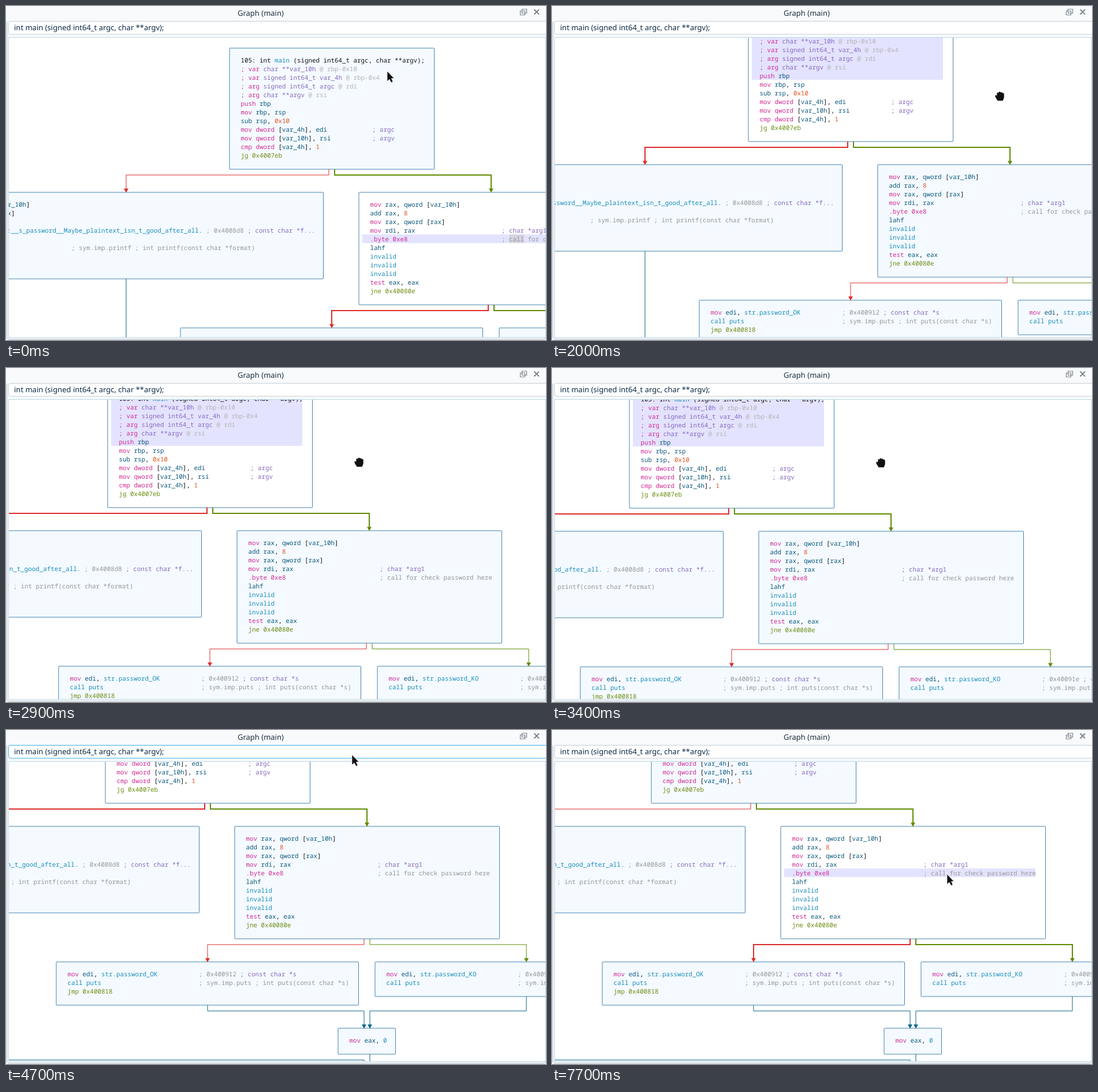
Recreate the animation shown at these times as an HTML page. Size 935 px wide and 579 px high, loop 8000 ms.

```html
<!DOCTYPE html>
<html lang="en">
<head>
<meta charset="utf-8">
<title>Graph (main)</title>
<style>
html, body { margin: 0; width: 100%; height: 100%; overflow: hidden; background: #f8fafb; }
svg { display: block; width: 935px; height: 579px; }
text { white-space: pre; text-rendering: geometricPrecision; }
.ui { font: 13px "Noto Sans", sans-serif; fill: #1c2f3f; }
.code { font: 10.833px "Noto Sans Mono", monospace; fill: #111; }
.p { fill: #d32a94; } .d { fill: #0a587c; } .b { fill: #1a8cba; }
.o { fill: #e0531f; } .g { fill: #6b8c10; } .v { fill: #8768bd; }
.c { fill: #969696; } .l { fill: #b4b4b4; } .k { fill: #111; }
.node { fill: #f4faff; stroke: #4583b0; }
.node.on { fill: #fff; }
.mark { fill: #e4e3ff; visibility: hidden; }
.mark.on { visibility: visible; }
.edge path { fill: none; stroke: currentColor; }
.edge polygon { fill: currentColor; }
.edge.on path { stroke-width: 2; }
</style>
</head>
<body>
<svg viewBox="0 0 935 579">
  <defs><clipPath id="view"><rect x="5" y="55" width="929" height="519"/></clipPath></defs>
  <rect width="935" height="579" fill="#f8fafb"/>
  <path d="M1.5 27V573Q1.5 577.5 6 577.5H931Q934.5 577.5 934.5 574" fill="none" stroke="#b4bec6"/>
  <text class="ui" x="401" y="17">Graph (main)</text>
  <g fill="none" stroke="#7b868e">
    <path d="M893.5 5.5H901.5V12.5H893.5ZM890.5 8.5H898.5V15.5H890.5Z" stroke-width="1.2"/>
    <path d="M914.5 6L923 14.5M923 6L914.5 14.5" stroke-width="2"/>
  </g>
  <rect id="field" x="4.5" y="26.5" width="940" height="22.5" rx="3" fill="#fff"/>
  <text class="ui" x="14" y="42" style="fill:#0b2a45">int main (signed int64_t argc, char **argv);</text>
  <rect x="4.5" y="54.5" width="930" height="520" fill="#fff" stroke="#bcd7e6"/>
  <g clip-path="url(#view)"><g id="graph"></g></g>
  <g id="pointer" fill="#111" stroke="#fff" stroke-width=".6">
    <path id="arrow" d="M0 0V17.5L4 14L7 19.7L10 18.3L7.4 12.6H12Z"/>
    <path id="hand" transform="translate(8 5)" d="M-8 0C-8-2-6-2-5-1V-4C-5-6-3-6.8-2-5.8C-1-8.3 1-8.3 2-6.3C3-7.7 5-7 5-5.2C7-6 8-5 8-3V2C8 5 6 6 6 8.5H-4C-4 6-8 3-8 0Z"/>
  </g>
</svg>
<script>
const $ = id => document.getElementById(id);
const CELL = 6.5, ROW = 15, PAD = 19.5, NOTE = 35 * CELL;
const RED = '#de2b2b', GREEN = '#5f8b00', BLUE = '#0a6288';

// Lines: "code#note"; runs split by "|", each starting with its colour class.
// mark: first row and row count of the highlight.
const nodes = {
  main: { cx: 564, y: 73, w: 354.5, mark: [0, 6], lines: [
    'k105: int |bmain|k (signed int64_t argc, char **argv);',
    'p; var |vchar **var_10h |l@ rbp-0x10',
    'p; var |vsigned int64_t var_4h |l@ rbp-0x4',
    'p; arg |vsigned int64_t argc |l@ rdi',
    'p; arg |vchar **argv |l@ rsi',
    'ppush |drbp', 'pmov |drbp, rsp', 'dsub rsp, |o0x10',
    'pmov dword |d[var_4h], edi#v; argc',
    'pmov qword |d[var_10h], rsi#v; argv',
    'pcmp dword |d[var_4h], |o1', 'gjg 0x4007eb'] },
  usage: { cx: 208, y: 323, w: 683.5, lines: [
    'pmov |drax, qword [var_10h]', 'pmov |drax, qword [rax]', 'pmov |drsi, rax',
    'pmov |dedi, |bstr.Usage:__s_password__Maybe_plaintext_isn_t_good_after_all.|c ; 0x4008d8 |v; const char *f...',
    'pmov |deax, |b0',
    'bcall printf#c; sym.imp.printf ; int printf(const char *format)',
    'pmov |deax, |b1', 'gjmp 0x40081d'] },
  check: { cx: 840, y: 323, w: 458.5, mark: [4, 1], lines: [
    'pmov |drax, qword [var_10h]', 'dadd rax, |o8', 'pmov |drax, qword [rax]',
    'pmov |drdi, rax#v; char *arg1',
    'p.byte 0xe8#c; call for check password here',
    'dlahf', 'binvalid', 'binvalid', 'binvalid', 'ptest |deax, eax', 'gjne 0x40080e'] },
  ok: { cx: 564, y: 558, w: 523.5, lines: [
    'pmov |dedi, |bstr.password_OK#c; 0x400912 |v; const char *s',
    'bcall puts#c; sym.imp.puts ; int puts(const char *s)', 'gjmp 0x400818'] },
  ko: { cx: 1116, y: 558, w: 523.5, lines: [
    'pmov |dedi, |bstr.password_KO#c; 0x40091e |v; const char *s',
    'bcall puts#c; sym.imp.puts ; int puts(const char *s)'] },
  end: { cx: 840, y: 673, w: 99.5, lines: ['pmov |deax, |b0'] },
  exit: { cx: 840, y: 758, w: 73.5, lines: ['dleave', 'dret'] }
};

// from, to, colour, shift at the start, shift at the tip
const edges = [
  ['main', 'usage', RED, -5, 0], ['main', 'check', GREEN, 5, 0],
  ['check', 'ok', RED, -5, 0], ['check', 'ko', GREEN, 5, 0],
  ['ok', 'end', BLUE, 0, -5], ['ko', 'end', BLUE, 0, 5],
  ['usage', 'exit', BLUE, 0, -5], ['end', 'exit', BLUE, 5, 5]
];

const height = node => node.lines.length * ROW + 30;

function text(x, y, src) {
  const runs = src.split('|').map(run => {
    const body = run.slice(1).replace(/[\[\],]+/g, '<tspan class="k">$&</tspan>');
    return `<tspan class="${run[0]}">${body}</tspan>`;
  });
  return `<text class="code" xml:space="preserve" x="${x}" y="${y}">${runs.join('')}</text>`;
}

const rect = (attrs, x, y, w, h) =>
  `<rect ${attrs} x="${x}" y="${y}" width="${w}" height="${h}"/>`;

function drawNode([id, node]) {
  const { cx, y, w, mark, lines } = node;
  const x = Math.round(cx - w / 2), rowTop = i => y + 13 + i * ROW;
  let out = rect(`class="node" data-of="${id}" rx="1"`, x, y, w, height(node));
  if (mark) {
    out += rect(`class="mark" data-of="${id}"`, x + 6, rowTop(mark[0]), w - 23.5, mark[1] * ROW);
  }
  if (id === 'check') {
    out += rect('id="word" fill="#d6d4e2"', x + PAD + NOTE + 2 * CELL, rowTop(4), 4 * CELL, ROW);
  }
  lines.forEach((line, i) => {
    const [code, note] = line.split('#'), base = rowTop(i) + 12;
    out += text(x + PAD, base, code);
    if (note) out += text(x + PAD + NOTE, base, note);
  });
  return out;
}

function drawEdge([from, to, color, out, into]) {
  const a = nodes[from], b = nodes[to], x = b.cx + into;
  return `<g class="edge" data-of="${from} ${to}" color="${color}">` +
    `<path d="M${a.cx + out} ${a.y + height(a)}V${b.y - 30}H${x}V${b.y - 1}"/>` +
    `<polygon points="${x - 4},${b.y - 6.5} ${x + 4},${b.y - 6.5} ${x},${b.y + .5}"/></g>`;
}

$('graph').innerHTML = Object.entries(nodes).map(drawNode).join('') + edges.map(drawEdge).join('');
const parts = [...document.querySelectorAll('[data-of]')];

function select(id) {
  for (const el of parts) el.classList.toggle('on', el.dataset.of.split(' ').includes(id));
}

// Pointer strokes: end time, duration, target
const strokes = [
  [1300, 600, 814, 199],
  [2000, 300, 767, 151], [2400, 400, 619, 152], [2700, 100, 611, 156],
  [2900, 100, 603, 158], [3200, 300, 562, 157], [3400, 100, 561, 159],
  [3900, 500, 594, 58], [4100, 200, 599, 43],
  [5400, 400, 466, 120], [6200, 700, 542, 190], [6400, 200, 570, 228],
  [7300, 900, 683, 250], [7500, 100, 684, 250]
];
const GRAB = 1500, RELEASE = 4700, CLICK = 100, CLICK2 = 7700;

function tip(t) {
  let x = 660, y = 113;
  for (const [end, span, tx, ty] of strokes) {
    const f = Math.min(1, Math.max(0, 1 - (end - t) / span));
    x += (tx - x) * f;
    y += (ty - y) * f;
  }
  return [Math.round(x), Math.round(y)];
}

const move = (el, x, y) => el.setAttribute('transform', `translate(${x} ${y})`);
const show = (el, on) => { el.style.display = on ? '' : 'none'; };

function render(t) {
  const grabbing = t >= GRAB && t < RELEASE;
  const [x, y] = tip(t), [x0, y0] = tip(GRAB);
  // The graph follows the pointer while it is held.
  const [x1, y1] = tip(Math.min(Math.max(t, GRAB), RELEASE));
  move($('graph'), x1 - x0, y1 - y0);
  move($('pointer'), x, y);
  show($('arrow'), !grabbing);
  show($('hand'), grabbing);
  show($('word'), t < CLICK);
  $('field').setAttribute('stroke', t >= RELEASE && y < 50 && t < 5100 ? '#3daee9' : '#c3ced6');
  select(t < CLICK || t >= CLICK2 ? 'check' : 'main');
}

const start = performance.now();
let last = -1;
function tick() {
  const t = Math.floor((performance.now() - start) % 8000 / 100) * 100;
  if (t !== last) render(last = t);
  requestAnimationFrame(tick);
}
tick();
</script>
</body>
</html>
```
